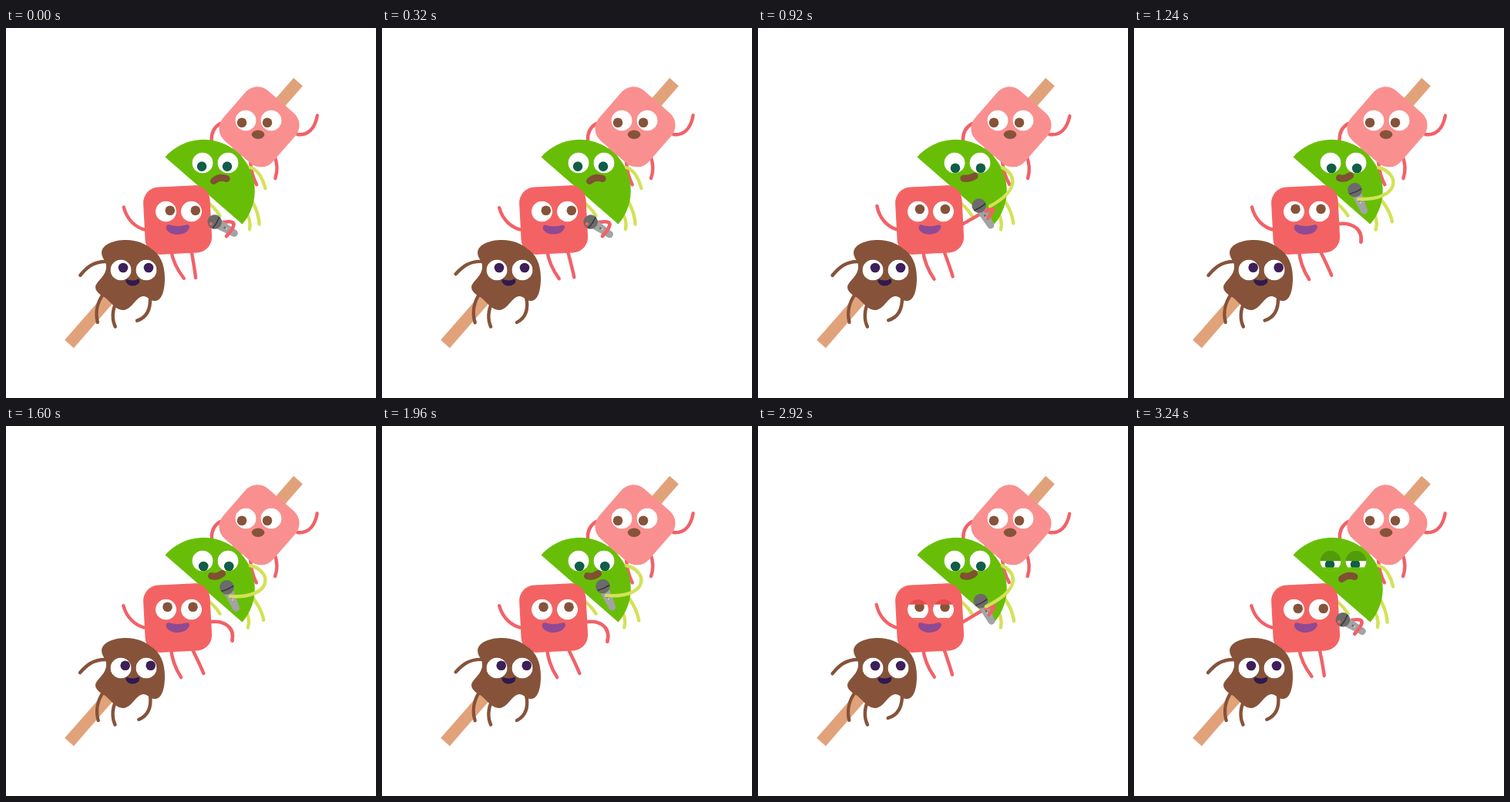
An HTML page that plays this animation: 480x480 px, repeating every 3.28 s.

```html
<!DOCTYPE html>
<html lang="en">
<head>
<meta charset="utf-8">
<title>Karaoke skewer</title>
<style>
  html, body { margin: 0; width: 100%; height: 100%; overflow: hidden; background: #fff; }
  svg { display: block; width: 100%; height: 100%; }
  .limb { fill: none; stroke-width: 4.4; stroke-linecap: round; }
  .red { stroke: #f26168; }
  .lime { stroke: #d3e257; }
  .choc { stroke: #86533a; }
</style>
</head>
<body>
<svg viewBox="0 0 480 480">
  <path d="M82 410 379 70" stroke="#e1a27a" stroke-width="15.6"/>
  <g id="limbs"></g>

  <rect x="-43" y="-43" width="86" height="86" rx="21" fill="#fa8f8f" transform="translate(328.5 128.3) rotate(41)"/>
  <path d="M206.5 167.500A66.200 66.200 0 0 1 306.5 254.500Z" fill="#68be06"/>
  <rect x="-43.3" y="-43.7" width="86.6" height="87.4" rx="20" fill="#f46363" transform="translate(222.6 249) rotate(-3)"/>
  <path fill="#86533a" d="M124 291C125 281 139 275 156 275C170 275 181 280 188 286C200 293 206 307 206 325C206 339 203 353 194 354C187 355 185 348 178 348C168 349 164 365 152 366C143 366 137 357 129 350C122 346 116 342 116 336C117 328 131 322 130 308C130 302 124 299 124 291Z"/>

  <g id="faces"></g>
  <ellipse cx="327" cy="138.3" rx="8.3" ry="5.7" fill="#86533a"/>
  <path id="limeMouth" fill="none" stroke="#7f5132" stroke-width="9" stroke-linecap="round"/>
  <path id="redMouth" fill="#8f4a93" d="M-12 -6Q0 -2 12 -6Q17 -5 14 0Q10 7 -1 7Q-11 7 -15 0Q-16 -6 -12 -6Z"/>
  <path fill="#2f1a4f" d="M156.500 326Q165 329 172 325.500Q175 328 171.500 332Q165 336.500 158.500 333Q153.500 328 156.500 326Z"/>

  <path id="redArm" class="limb red"/>
  <g id="mic">
    <path d="M3 -6.500 30 -4.500Q34 -4 34 0T30 4.500L3 6.500Z" fill="#a3a3a3"/>
    <circle cx="15" r="1.300" fill="#666"/>
    <circle cx="18" r=".9" fill="#ddd"/>
    <circle r="9.300" fill="#6b6b6b"/>
    <path d="M2 -8.500Q3.500 0 2 8.500" fill="none" stroke="#333" stroke-width="1.400"/>
  </g>
  <path id="redHand" class="limb red" pathLength="100" stroke-dasharray="0 58 60"/>
  <path id="limeArm" class="limb lime"/>
</svg>
<script>
const LOOP = 3280, BEAT = LOOP / 8, STEP = 40;
const NS = 'http://www.w3.org/2000/svg';
const $ = id => document.getElementById(id);

function add(parent, tag, attrs) {
  const el = document.createElementNS(NS, tag);
  for (const k in attrs) el.setAttribute(k, attrs[k]);
  return parent.appendChild(el);
}

const mix = (a, b, u) => a.map((v, i) => v + (b[i] - v) * u);

function ease(t, from, to) {
  const u = Math.min(1, Math.max(0, (t - from) / (to - from)));
  return u * u * (3 - 2 * u);
}

// 0: red sings, 1: the microphone changes hands, 2: lime sings
const turn = t => 2 * (ease(t, 700, 1180) - ease(t, 2590, 3270));
const pose = ([red, pass, lime], k) => k < 1 ? mix(red, pass, k) : mix(pass, lime, k - 1);

// Swings with the beat, peaking at the given fraction of it
const swing = (t, peak) => Math.cos(2 * Math.PI * (t / BEAT - peak));

// Limbs turn about their joint: joint x, y, shape, sway and lean in degrees
const groups = [
  { cls: 'choc', peak: .15, power: () => 1, limbs: [
    [131, 303, 'c-18 -1 -27 8 -35 17', -2, 0],
    [127, 344, 'c-8 11 -11 25 -7.300 38', 2.2, 0],
    [142, 358, 'c-4 8 -5 20 -.500 29.500', -1, 0],
    [187, 349, 'c2 16 -3 27 -14.700 31.800', 7, 0]] },
  { cls: 'red', peak: .32, power: () => 1, limbs: [
    [278, 124, 'c-9 5 -12 12 -11.600 22', 1.5, 0],
    [378, 138, 'c14 2 23 -8 26 -24.300', 1, 0],
    [348, 165, 'c4 10 5 20 1.500 30', -1, 0],
    [317, 173, 'c1 12 4 22 8.500 30', -1.5, 0],
    [182, 262, 'c-14 -3 -25 -14 -28.700 -30', 2.3, 0]] },
  { cls: 'red', peak: 0, power: h => 1 - h, limbs: [
    [214, 288, 'c2 16 8 27 15.500 37.300', -2, 3.5],
    [240, 286, 'c4 14 7 24 10 37.200', 6, -10]] },
  { cls: 'lime', peak: .1, power: h => h, limbs: [
    [312, 213, 'c9 13 16 27 16.500 41.500', -2, -7.5],
    [308, 234, 'c7 9 10 18 8 27', 1, 4],
    [258, 224, 'c8 5 15 12 19.500 19.500', 0, 0]] }
];
for (const g of groups)
  g.paths = g.limbs.map(([, , d]) => add($('limbs'), 'path', { class: 'limb ' + g.cls, d: 'M0 0' + d }));

// Gaze is one offset, or one for each stage of the song
const faces = [
  { x: 311, y: 120, skin: '#fa8f8f', lid: '#ee7878', iris: '#86533a', blink: 2240,
    gaze: [[-5, 2.8], [-5, 2.8], [-5, 2.8]] },
  { x: 255, y: 175, skin: '#68be06', lid: '#529c08', iris: '#105d48', blink: 3200,
    gaze: [[-1, 4.6], [1.2, 7], [1.2, 7]] },
  { x: 207.5, y: 238, skin: '#f46363', lid: '#e54c4c', iris: '#86533a', blink: 2980,
    gaze: [[5.3, -1.3], [2, -3.3], [2, -3.3]] },
  { x: 149, y: 314, skin: '#86533a', lid: '#714423', iris: '#3d2058', blink: 660,
    gaze: [[3, -3], [3, -3], [5.7, -3.3]] }
];
add(add($('faces'), 'clipPath', { id: 'eye' }), 'circle', { r: 13.6 });
for (const f of faces) {
  f.eyes = [0, 33].map(dx => {
    const g = add($('faces'), 'g', { transform: `translate(${f.x + dx} ${f.y})`, 'clip-path': 'url(#eye)' });
    add(g, 'circle', { r: 13.6, fill: '#fff' });
    return {
      pupil: add(g, 'circle', { r: 6.3, fill: f.iris }),
      low: add(g, 'rect', { x: -15, width: 30, height: 30, fill: f.skin }),
      lid: add(g, 'rect', { x: -15, y: -45, width: 30, fill: f.lid })
    };
  });
}

// Microphone: x, y, angle. Arms: two controls and the hand.
const micPoses = [[270.7, 251.5, 34], [289, 227, 63], [286.5, 208.7, 66]];
const redArmPoses = [
  [274, 255, 313, 240, 286, 270],
  [285, 243, 322, 217, 299, 244],
  [283, 252, 297, 261, 293, 279]
];
const limeArmPoses = [
  [328, 184, 334, 198, 336.5, 208],
  [336, 192, 340, 212, 296, 234],
  [347, 189, 345, 224, 291, 220.5]
];

function drawLimbs(t, h) {
  for (const g of groups) {
    const beat = g.power(h) * swing(t, g.peak);
    g.limbs.forEach(([x, y, , sway, lean], i) =>
      g.paths[i].setAttribute('transform', `translate(${x} ${y}) rotate(${sway * beat + lean * h})`));
  }
}

function drawFaces(t, k) {
  for (const f of faces) {
    const [x, y] = pose(f.gaze, k);
    const near = Math.max(0, 1 - Math.abs(t - f.blink) / 80);
    const shut = Math.sin(near * Math.PI / 2);
    for (const { pupil, low, lid } of f.eyes) {
      pupil.setAttribute('cx', x);
      pupil.setAttribute('cy', y);
      low.setAttribute('y', 14 - 8 * shut);
      lid.setAttribute('height', 31 + 20 * shut);
    }
  }
}

function drawMouths(t, k, h) {
  const open = 1 - (1 - h) * .08 * (1 - swing(t, 0));
  $('redMouth').setAttribute('transform', `translate(223 261) scale(${open})`);
  // centre, half width and bend: a frown turns into a smile
  const [x, y, w, bend] = mix([277.8, 197, 8.3, -5], [273.5, 193, 7, 4], Math.min(1, k));
  $('limeMouth').setAttribute('d', `M${x - w} ${y + 1.5}Q${x - 1} ${y + bend} ${x + w} ${y - 1.5}`);
}

function drawHands(t, k, h) {
  const bob = 1.6 * h * swing(t, .1);
  const [x, y, angle] = pose(micPoses, k);
  const tilt = angle - 4 * (1 - h) * swing(t, 0);
  $('mic').setAttribute('transform', `translate(${x} ${y + bob}) rotate(${tilt})`);

  const red = pose(redArmPoses, k), lime = pose(limeArmPoses, k);
  red[4] += bob;
  red[5] -= bob;
  lime[5] += bob;
  for (const id of ['redArm', 'redHand']) $(id).setAttribute('d', 'M266 254C' + red.join(' '));
  $('limeArm').setAttribute('d', 'M317 181C' + lime.join(' '));
}

function draw(t) {
  const k = turn(t), h = k / 2;
  drawLimbs(t, h);
  drawFaces(t, k);
  drawMouths(t, k, h);
  drawHands(t, k, h);
}

const start = performance.now();
function tick() {
  const t = (performance.now() - start) % LOOP;
  draw(Math.floor(t / STEP) * STEP);
  requestAnimationFrame(tick);
}
tick();
</script>
</body>
</html>
```
